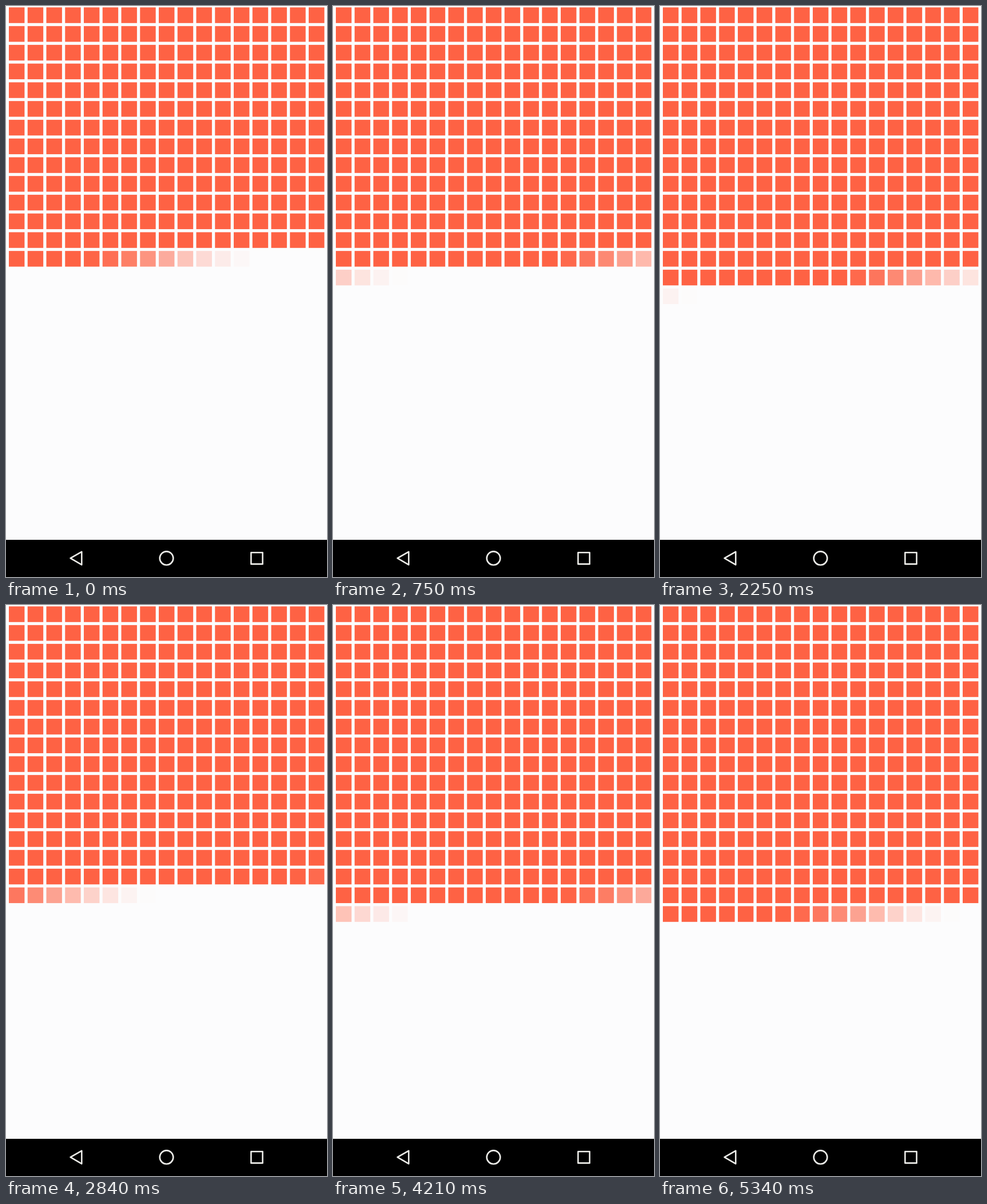
Recreate the animation shown at these times as an HTML page with a canvas. Size 561 by 998 pixels, loop 5390 ms.

```html
<!DOCTYPE html>
<html lang="en">
<head>
<meta charset="utf-8">
<title>Filling grid</title>
<style>
html, body { margin: 0; width: 100%; height: 100%; overflow: hidden; background: #fcfcfd; }
canvas { display: block; width: 561px; height: 998px; }
</style>
</head>
<body>
<canvas id="stage" width="561" height="998"></canvas>
<script>
const ctx = document.getElementById('stage').getContext('2d');
const W = 561, H = 998, LOOP = 5390;
const COLS = 17, PITCH = 32.75, LEFT = 5, TOP = 2.4, SIZE = 27.4;
const STEP = 100, FADE = 1000;   // ms between tiles, ms per fade
const HEAD = 234.1;              // tiles already started at time zero

const ease = x => (1 - Math.cos(Math.PI * Math.min(1, Math.max(0, x)))) / 2;

function drawTiles(t) {
  const head = HEAD + t / STEP;
  ctx.fillStyle = '#fe6244';
  for (let i = 0; i < head; i++) {
    ctx.globalAlpha = ease((head - i) * STEP / FADE);
    ctx.fillRect(LEFT + (i % COLS) * PITCH, TOP + Math.floor(i / COLS) * PITCH, SIZE, SIZE);
  }
  ctx.globalAlpha = 1;
}

function drawNavBar() {
  ctx.fillStyle = '#000';
  ctx.fillRect(0, 933, W, H - 933);
  ctx.strokeStyle = '#ecece8';
  ctx.lineWidth = 2.6;
  ctx.lineJoin = 'round';

  ctx.beginPath();
  ctx.moveTo(112.6, 965.2);
  ctx.lineTo(132.3, 953.8);
  ctx.lineTo(132.3, 976.6);
  ctx.closePath();
  ctx.stroke();

  ctx.beginPath();
  ctx.arc(280.5, 965.2, 11.8, 0, Math.PI * 2);
  ctx.stroke();

  ctx.strokeRect(428.3, 955.2, 20.2, 20.2);
}

function frame(now) {
  ctx.fillStyle = '#fcfcfd';
  ctx.fillRect(0, 0, W, H);
  drawTiles((now - start) % LOOP);
  drawNavBar();
  requestAnimationFrame(frame);
}

const start = performance.now();
frame(start);
</script>
</body>
</html>
```
